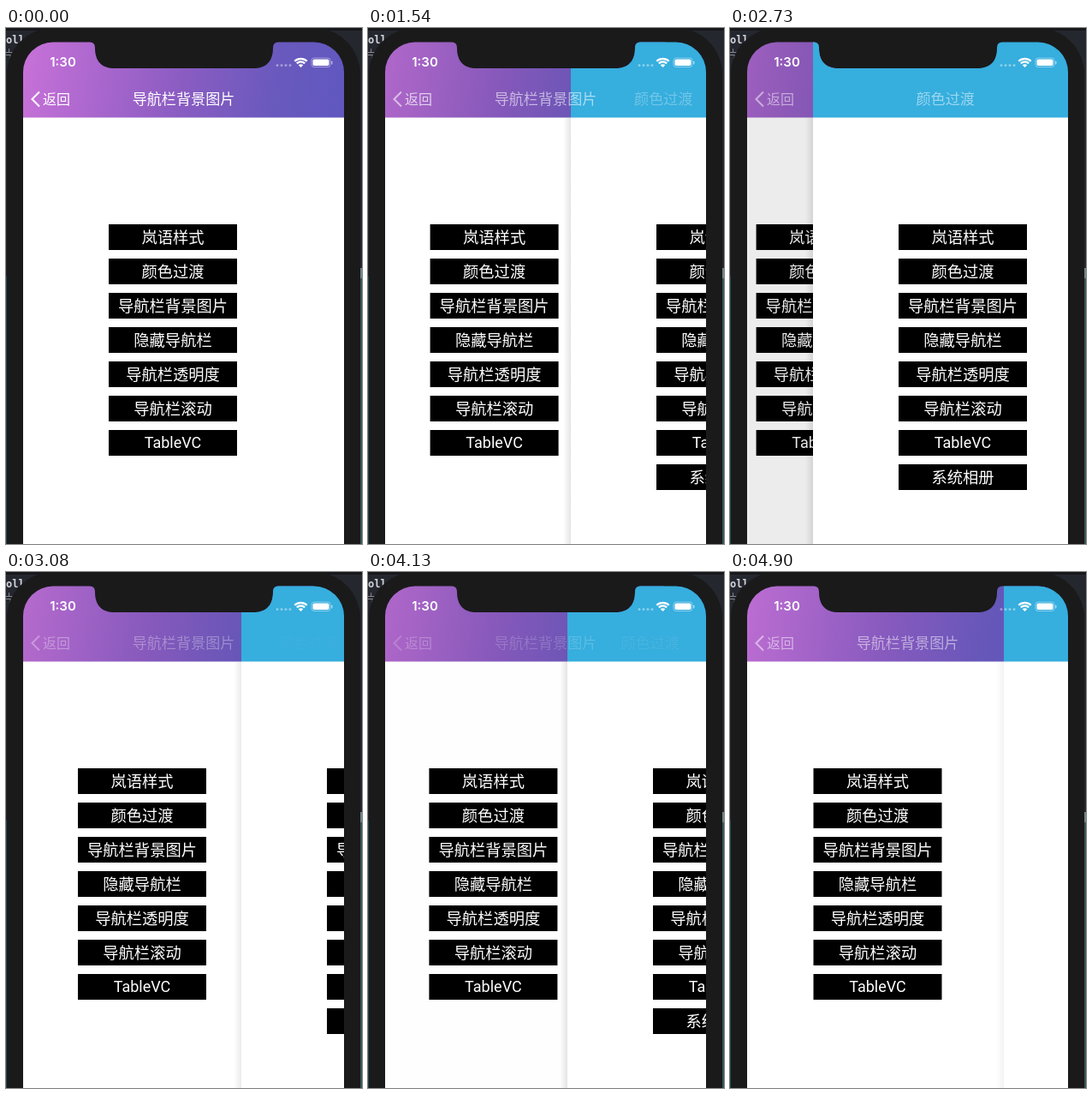
An HTML page with a canvas that plays this animation: 416x602 px, repeating every 4970 ms.

```html
<!DOCTYPE html>
<html lang="zh-CN">
<head>
<meta charset="utf-8">
<style>
  html, body { margin: 0; width: 416px; height: 602px; overflow: hidden; background: #1a1a1b; }
  canvas { display: block; }
</style>
</head>
<body>
<canvas id="stage" width="416" height="602"></canvas>
<script>
const ctx = document.getElementById('stage').getContext('2d');
const LOOP = 4970, TICK = 70, WIDTH = 375, LEFT = 20, TOP = 16.5, BAR_END = 104.5;
const CJK = '"Noto Sans CJK SC", "Noto Sans CJK", "Noto Sans CJK JP", sans-serif';
const LABELS = ['岚语样式', '颜色过渡', '导航栏背景图片', '隐藏导航栏', '导航栏透明度', '导航栏滚动', 'TableVC', '系统相册'];

const purple = ctx.createLinearGradient(0, 30, WIDTH, 85);
purple.addColorStop(0, '#c771d8');
purple.addColorStop(0.5, '#8a5cc2');
purple.addColorStop(0.8, '#6859bd');
purple.addColorStop(1, '#6058c0');

const imagePage = { title: '导航栏背景图片', bar: purple, rows: 7 };
const colorPage = { title: '颜色过渡', bar: '#36aede', rows: 8 };

// Finger positions of the two edge swipes: [time, offset]
const firstSwipe = [[70, 0], [420, 22], [880, 200], [1400, 0]];
const secondSwipe = [[2520, 0], [2730, 77], [3250, 320], [3640, 318], [4130, 213], [4900, 300]];
const PUSH_START = 1490, PUSH_END = 2170;

const clamp = (v, lo, hi) => Math.min(hi, Math.max(lo, v));

// Smooth curve through the points, at rest at both ends
function follow(points, t) {
  const last = points.length - 1;
  if (t <= points[0][0]) return points[0][1];
  if (t >= points[last][0]) return points[last][1];
  const i = points.findIndex(p => p[0] > t) - 1;
  const slope = k => k === 0 || k === last ? 0
    : (points[k + 1][1] - points[k - 1][1]) / (points[k + 1][0] - points[k - 1][0]);
  const [t0, a] = points[i], [t1, b] = points[i + 1];
  const d = t1 - t0, u = (t - t0) / d, u2 = u * u, u3 = u2 * u;
  const value = (2 * u3 - 3 * u2 + 1) * a + (u3 - 2 * u2 + u) * d * slope(i)
    + (3 * u2 - 2 * u3) * b + (u3 - u2) * d * slope(i + 1);
  return clamp(value, 0, WIDTH);
}

function stateAt(t) {
  if (t < PUSH_START) return { under: imagePage, top: imagePage, x: follow(firstSwipe, t) };
  const pushing = t < PUSH_END;
  const x = pushing ? WIDTH * Math.exp(-10.9 * (t - PUSH_START) / 1000) : follow(secondSwipe, t);
  return { under: imagePage, top: colorPage, x, pushing };
}

function text(str, x, y, font, color = '#fff', align = 'center') {
  ctx.font = font;
  ctx.fillStyle = color;
  ctx.textAlign = align;
  ctx.fillText(str, x, y);
}

function rect(x, y, w, h, color) {
  ctx.fillStyle = color;
  ctx.fillRect(x, y, w, h);
}

function rounded(x, y, w, h, r, color) {
  ctx.beginPath();
  ctx.roundRect(x, y, w, h, r);
  ctx.fillStyle = color;
  ctx.fill();
}

function drawDesktop() {
  rect(0, 0, 416, 602, '#25272f');
  rect(0, 0, 416, 3, '#17181b');
  rect(0, 290, 3, 312, '#23494c');
  rect(412, 280, 4, 322, '#3a5556');
  rect(412, 280, 4, 12, '#6f8583');
  text('oll', 0, 18, 'bold 12px "DejaVu Sans Mono", monospace', '#d3d5da', 'left');
  text('片', -4, 35, '13px ' + CJK, '#85878d', 'left');
  rounded(1, 0, 413, 700, 54, '#1a1a1b');
}

function screenPath() {
  const right = LEFT + WIDTH, radius = 35;
  ctx.beginPath();
  ctx.moveTo(LEFT, 602);
  ctx.arcTo(LEFT, TOP, right, TOP, radius);
  ctx.lineTo(98, TOP);
  ctx.quadraticCurveTo(104, TOP, 104, 23);
  ctx.bezierCurveTo(104, 39, 112, 47, 127, 47);
  ctx.lineTo(289, 47);
  ctx.bezierCurveTo(304, 47, 312, 39, 312, 23);
  ctx.quadraticCurveTo(312, TOP, 318, TOP);
  ctx.arcTo(right, TOP, right, 602, radius);
  ctx.lineTo(right, 602);
  ctx.closePath();
}

function drawPage(page, x) {
  ctx.save();
  ctx.translate(LEFT + x, 0);
  rect(0, BAR_END - 1, WIDTH, 602, '#fff');
  rect(0, 0, WIDTH, BAR_END, page.bar);
  LABELS.slice(0, page.rows).forEach((label, i) => {
    const y = 229 + 40 * i;
    rect(100, y, 150, 30, '#000');
    const latin = label === 'TableVC';
    text(label, 175, y + (latin ? 21 : 21.5), latin ? '18px Roboto, sans-serif' : '18.3px ' + CJK);
  });
  ctx.restore();
}

function drawShade(x) {
  const p = x / WIDTH, edge = LEFT + x;
  const black = alpha => `rgba(0,0,0,${alpha})`;
  rect(LEFT, 0, x, BAR_END, black(0.1 * (1 - p)));
  rect(LEFT, BAR_END, x, 602, black(Math.max(0, 0.085 * (1 - 3 * p * p))));

  const fade = ctx.createLinearGradient(edge - 9, 0, edge, 0);
  fade.addColorStop(0, black(0));
  fade.addColorStop(1, black(Math.min(0.1, 0.25 * (1 - p))));
  rect(edge - 9, BAR_END, 9, 602 - BAR_END, fade);
}

function drawBarItems({ under, top, x, pushing }) {
  const p = x / WIDTH;
  const topAlpha = pushing ? (1 - p) ** 1.4 : (1 - p) ** 3;
  const underAlpha = pushing ? p : p ** 3;
  const titleFont = '500 17.1px ' + CJK;

  ctx.globalAlpha = underAlpha;
  text(under.title, 207.5, 89, titleFont);
  ctx.globalAlpha = topAlpha;
  text(top.title, 207.5 + x * (pushing ? 0.635 : 0.574), 89, titleFont);

  ctx.globalAlpha = 1 - (1 - topAlpha) * (1 - underAlpha);
  text('返回', 43, 89, '16px ' + CJK, '#fff', 'left');

  ctx.globalAlpha = Math.max(topAlpha, underAlpha);
  ctx.beginPath();
  ctx.moveTo(39, 74.5);
  ctx.lineTo(30.5, 83);
  ctx.lineTo(39, 91.5);
  ctx.lineWidth = 2;
  ctx.strokeStyle = '#fff';
  ctx.stroke();
  ctx.globalAlpha = 1;
}

function drawStatus() {
  text('1:30', 66.5, 45, '600 15px Inter, sans-serif');
  for (let i = 0; i < 4; i++) rounded(315.5 + 5 * i, 42, 3, 3, 1.5, 'rgba(255,255,255,.4)');

  ctx.save();
  ctx.beginPath();
  ctx.moveTo(344.5, 46);
  ctx.arc(344.5, 46, 14, -Math.PI * 0.75, -Math.PI * 0.25);
  ctx.clip();
  ctx.strokeStyle = '#fff';
  ctx.lineWidth = 2.3;
  for (const r of [10.2, 6.6]) {
    ctx.beginPath();
    ctx.arc(344.5, 46, r, 0, 2 * Math.PI);
    ctx.stroke();
  }
  ctx.beginPath();
  ctx.arc(344.5, 46, 3.8, 0, 2 * Math.PI);
  ctx.fillStyle = '#fff';
  ctx.fill();
  ctx.restore();

  ctx.beginPath();
  ctx.roundRect(357, 35, 22, 10.5, 3);
  ctx.lineWidth = 1;
  ctx.strokeStyle = 'rgba(255,255,255,.4)';
  ctx.stroke();
  rounded(358.5, 36.5, 19, 7.5, 1.8, '#fff');
  rounded(380, 38.5, 1.5, 4, 0.7, 'rgba(255,255,255,.5)');
}

function draw(t) {
  const state = stateAt(t);
  state.x = Math.round(state.x);
  drawDesktop();
  ctx.save();
  screenPath();
  ctx.clip();
  if (state.x > 0) {
    drawPage(state.under, 0.3 * (state.x - WIDTH));
    drawShade(state.x);
  }
  drawPage(state.top, state.x);
  drawBarItems(state);
  drawStatus();
  ctx.restore();
}

const start = performance.now();
function frame() {
  const t = (performance.now() - start) % LOOP;
  draw(Math.floor(t / TICK) * TICK);
  requestAnimationFrame(frame);
}
frame();
</script>
</body>
</html>
```
